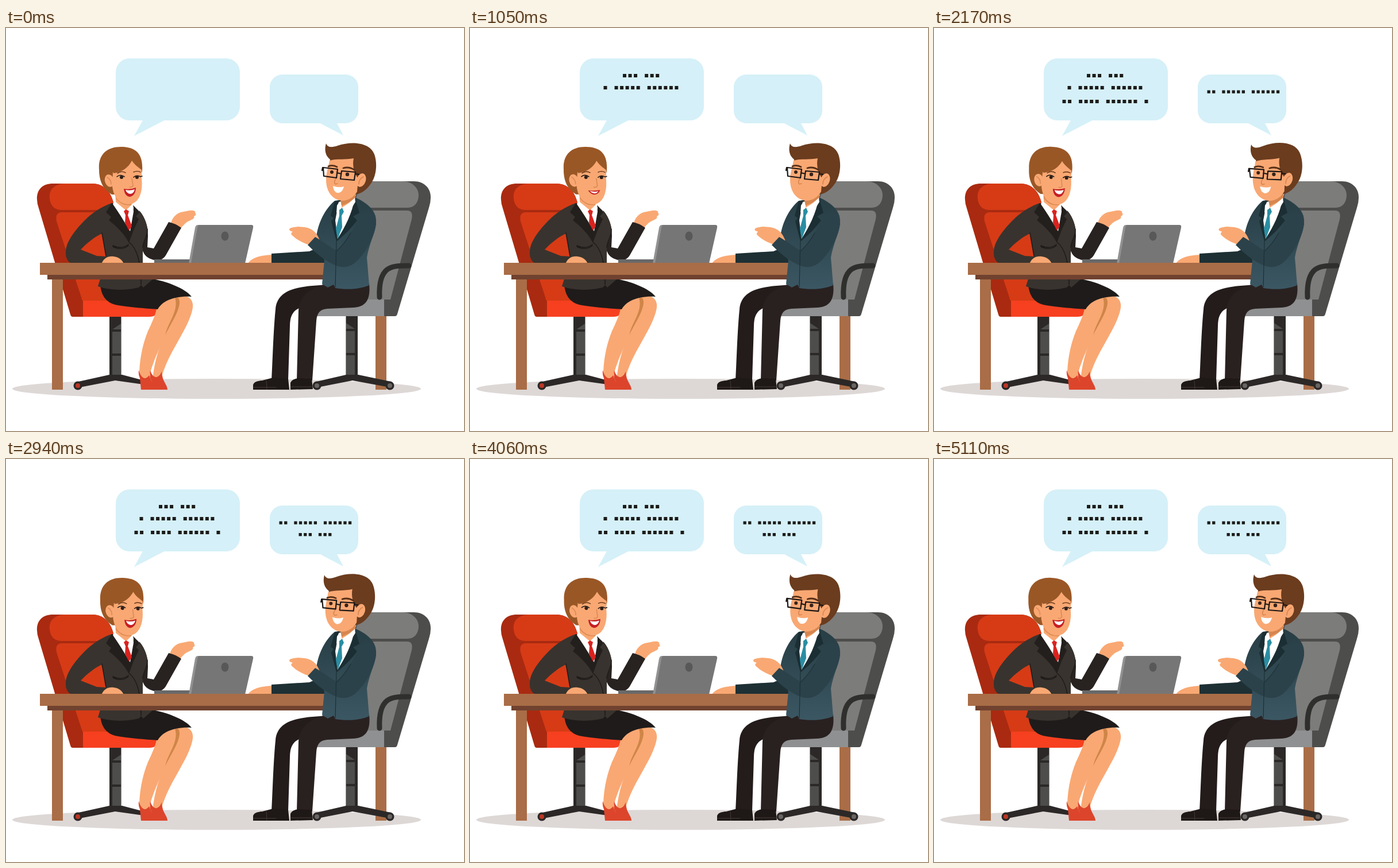
Write an HTML page that moves like this. It is 797 px wide and 702 px high and loops after 5180 ms.

```html
<!DOCTYPE html>
<html lang="en">
<head>
<meta charset="utf-8">
<title>Conversation at a desk</title>
<style>
html, body { margin: 0; width: 100%; height: 100%; overflow: hidden; background: #fff; }
svg { display: block; width: 100%; height: 100%; }
.line { fill: none; stroke-linecap: round; stroke-linejoin: round; }
.skin { fill: #f9a873; }
.wood { fill: #a96d47; }
.dark { fill: #2b2827; }
.grey { fill: #4d4d4c; }
</style>
</head>
<body>
<svg viewBox="0 0 797 702">
  <defs>
    <linearGradient id="suit" x1="0" y1="0" x2="0" y2="1">
      <stop offset="0" stop-color="#273d44"/><stop offset="1" stop-color="#3b5763"/>
    </linearGradient>
    <g id="post">
      <path class="dark" d="M180 502h20.500v104h-20.500z"/>
      <path class="grey" d="M185 524L200 514V524zM185 528h15v38h-15zM185 570h15v34h-15z"/>
    </g>
  </defs>

  <g fill="#d5f0f8">
    <rect x="191" y="53" width="216" height="108" rx="24"/>
    <path d="M239 159L223 188L279 159z"/>
    <rect x="459" y="81" width="154" height="85" rx="22"/>
    <path d="M543 164L587 187L575 164z"/>
  </g>
  <g id="dots" fill="#1c1c1a"></g>

  <ellipse cx="366.500" cy="628.500" rx="355.500" ry="17.500" fill="#ddd8d6"/>

  <!-- red chair -->
  <path fill="#a92a10" d="M54 299C53 281 64 271 82 271H150C172 271 183 287 187 304L212 503H116Q113 503 112 499L57 314Q54 306 54 299z"/>
  <path fill="#d63b16" d="M76 297C74 279 88 271 103 271H150C171 271 182 286 187 304L190 317H95C83 316 77 308 76 297zM96 321H196L215 475H133L88 337Q85 322 96 321z"/>
  <path fill="#f64020" d="M134 475H275L264 495Q260 503 250 503H134z"/>
  <use href="#post" y="1"/>
  <path class="dark" d="M126 616L180 604H202L240 614V621L190 614L128 626z"/>
  <circle class="dark" cx="125" cy="623" r="7.500"/><circle cx="125" cy="623" r="4" fill="#bd3524"/>
  <path class="wood" d="M80 436H99V630H80z"/>

  <!-- woman: legs, skirt -->
  <path class="skin" d="M262 489C268 475 282 467 298 466L303 478C300 495 288 515 279 532C268 556 256 580 250 604L258 624L238 618L232 600C233 570 240 545 247 528C253 515 259 503 262 489z"/>
  <path class="skin" d="M292 468C313 462 327 470 325 487C322 507 308 530 297 550C286 569 278 585 272 604L274 620L258 618L256 604C259 580 267 553 277 533C290 510 301 494 292 468z"/>
  <path fill="#cf8548" d="M293 467C300 466 304 474 301 485C297 502 284 519 277 535C281 513 303 491 293 467z"/>
  <g fill="#dc452b">
    <path d="M231 596C234 607 241 616 249 605C252 616 260 622 260 630H235L233 610Q230 604 231 596z"/>
    <path d="M251 596C254 608 264 615 271 598C271 615 281 621 281 630H257Q256 618 251 610Q250 603 251 596z"/>
  </g>
  <path fill="#1f1b1a" d="M164 448L255 437C282 442 312 454 323 468C294 466 272 475 264 490C235 488 203 485 190 482C172 477 166 464 164 448z"/>

  <!-- woman: jacket, arms -->
  <path id="handW" class="skin" d="M286 348C286 336 292 325 304 321L319 318C326 317 331 319 329 322C332 324 330 327 327 328C329 331 325 333 321 335C313 338 307 344 300 356z"/>
  <path fill="#282321" d="M232 318C244 331 247 350 247 362L246 382L257 384L283 338Q294 340 305 348L278 396C272 405 263 407 254 403C244 400 238 393 236 381z"/>
  <path fill="#38332e" d="M184 305C166 311 150 322 138 334C122 350 105 371 104 389C103 401 109 411 119 411H172L160 450C183 458 212 457 231 452L235 448L239 452L255 438L238 411V380C243 368 247 360 246 348C244 334 234 318 220 309z"/>
  <path fill="#d63b16" d="M130 386C140 375 154 364 167 358L174 398L158 397z"/>
  <path class="skin" d="M166 411C170 401 177 397 187 398C196 399 202 403 205 411z"/>
  <path class="line" stroke="#1d1a19" stroke-width="1.500" d="M167 357L174 397M186 381C197 386 206 385 213 379M186 379C197 384 206 383 213 377M214 373C230 385 235 412 235 447M246 350C247 362 239 370 238 382"/>
  <path fill="#231f1d" d="M184 305L174 321L183 329L179 335C192 345 205 358 214 374L222 352L231 333L226 328L232 321L220 307z"/>
  <path fill="#fff" d="M186 305L193 300L221 302L222 320L216 354L200 328z"/>
  <path class="skin" d="M190 282L191 305L208 318L219 308V290z"/>
  <path fill="#dd8b55" d="M191 297Q203 312 219 308V302L191 285z"/>
  <path fill="#fff" d="M191 303L208 317L199 326L186 307zM219 307L211 317L219 325L222 313z"/>
  <path fill="#d9231f" d="M205 319L209 316L214 319L212 326L219 345L214 353L207 339L208 326z"/>

  <!-- woman: head -->
  <g id="headW">
    <path fill="#9a5726" d="M162 247C160 222 174 207 200 207C226 207 239 219 237 249L226 290H184C167 280 162 264 162 247z"/>
    <path class="skin" d="M186 251C203 251 213 243 219 231C224 239 231 243 236 247V262C239 288 230 308 212 307C196 306 187 293 185 276z"/>
    <ellipse class="skin" cx="180" cy="266" rx="8" ry="11" transform="rotate(-15 180 266)"/>
    <path class="line" stroke="#dc8a55" stroke-width="1.600" d="M176 260Q183 264 183 272M219 262L221 275Q219 278 215 277"/>
    <path fill="#9a5726" d="M183 237L222 224C215 241 204 251 187 253z"/>
    <path class="line" stroke="#74401f" stroke-width="1.600" d="M194 253Q201 248 208 252M222 251Q228 248 234 251"/>
    <path class="line" stroke="#241b18" stroke-width="1.600" d="M193 259Q199 254 206 259M222 260Q227 255 234 259L237 258"/>
    <circle cx="201" cy="260" r="3" fill="#30201a"/><circle cx="228" cy="260" r="3" fill="#30201a"/>
    <g id="smileW">
      <path fill="#c51f24" d="M205 280Q216 282 226 278C226 290 219 294 215 294C209 293 206 288 205 280z"/>
      <path fill="#fff" d="M208 282Q216 284 224 281Q222 289 216 289Q210 288 208 282z"/>
    </g>
    <g id="talkW">
      <path fill="#c51f24" d="M205 283Q216 284 226 282Q223 290 216 290Q210 290 205 283z"/>
      <path fill="#fff" d="M208 284Q216 286 223 284Q220 288 216 288Q212 288 208 284z"/>
    </g>
  </g>

  <!-- laptop -->
  <path fill="#696969" d="M258 403H322V410H258z"/>
  <path fill="#929292" d="M334 343H345L330 410H318L329 348Q330 343 334 343z"/>
  <path fill="#767676" d="M337 343H427Q431 343 430 348L416 410H322L333 348Q334 343 337 343z"/>
  <ellipse cx="381" cy="362.500" rx="6.500" ry="8" fill="#585858"/>

  <!-- grey chair -->
  <path class="wood" d="M643 495H662V630H643z"/>
  <path class="grey" d="M739 296C740 280 728 267 710 267H640C620 267 610 283 606 300L600 502H677Q680 502 681 498L736 313Q739 304 739 296z"/>
  <path fill="#7c7c7b" d="M718 293C719 278 706 267 690 267H640C622 267 612 282 608 300L605 313H699C711 313 717 304 718 293zM600 318H698Q709 318 706 333L669 473H600z"/>
  <path fill="#8f9091" d="M541 485L560 473H658V502H539z"/>
  <path class="line" stroke="#2f2f2e" stroke-width="9" d="M650 469C649 447 653 429 663 421C672 414 686 414 701 414"/>
  <use href="#post" transform="matrix(-1 0 0 1 792 0)"/>
  <path class="dark" d="M540 616L592 604H613L670 616L668 626L603 614L542 626z"/>
  <g class="dark"><circle cx="541" cy="623" r="7.500"/><circle cx="668" cy="623" r="7.500"/></g>
  <g fill="#686563"><circle cx="541" cy="623" r="4"/><circle cx="668" cy="623" r="4"/></g>

  <!-- table, far arm -->
  <path class="skin" d="M421 410C427 401 440 396 464 395V410z"/>
  <path fill="#1e3034" d="M462 393L528 389L556 377V411H462z"/>
  <path class="wood" d="M59 409H554V430H59z"/>
  <path fill="#70422f" d="M72 430H554V438H72z"/>

  <!-- man: legs -->
  <path fill="#231c1b" d="M560 447C520 450 472 450 469 490C465 530 464 580 462 614H491L494 519C494 503 499 493 510 488L580 481z"/>
  <path fill="#292120" d="M632 445C635 475 625 486 604 487L559 489C546 490 541 497 540 511L533 614H506L509 493C510 470 524 456 552 447z"/>
  <path fill="#1e1817" d="M430 630V622Q431 615 446 614L465 609L491 611L493 630zM495 630V618Q497 612 508 610L532 611L534 629z"/>
  <path class="line" stroke="#453a36" stroke-width="1" d="M431 626H470M453 614L454 629M496 625H532"/>

  <!-- man: jacket -->
  <path fill="url(#suit)" d="M572 301L607 295C628 304 645 318 644 337C642 357 631 380 628 400L632 448C614 456 590 456 573 453L570 447L560 452L550 446L554 405L540 364C543 340 555 315 572 301z"/>
  <path fill="#1b2e33" d="M572 302L565 327L570 331L566 337L575 372C592 358 603 346 611 335L604 328L615 322L607 295z"/>
  <path fill="#fff" d="M579 303L607 296C602 323 591 345 577 367L573 335z"/>
  <path class="skin" d="M584 286L612 273L607 299L584 313z"/>
  <path fill="#d78650" d="M582 300Q598 300 609 285L607 299L584 310z"/>
  <path fill="#fff" d="M607 296L587 313L596 322L608 303zM580 303L581 314L575 322L576 309z"/>
  <path fill="#2a8ea3" d="M580 317L585 313L588 320L584 327L585 347L577 368L574 350L580 327z"/>
  <path id="handM" class="skin" d="M546 370C541 356 533 349 520 347L508 346C500 347 493 348 493 351C493 353 496 354 499 355C495 357 496 360 499 362C506 369 518 375 534 380z"/>
  <path fill="#2b424b" d="M616 330C630 311 645 325 644 342C640 370 622 397 606 410C595 418 582 418 570 412C553 404 538 391 525 378L538 364C552 372 566 383 576 388C592 374 601 354 616 330z"/>
  <path class="line" stroke="#1d3036" stroke-width="1.200" d="M575 372L573 451M576 388Q589 376 600 357"/>

  <!-- man: head -->
  <g id="headM">
    <path fill="#6b3c1e" d="M557 201C560 209 568 208 577 205C603 196 634 200 641 220C647 237 644 259 635 271C627 283 617 289 608 290L600 243L563 237L564 229C555 222 554 211 557 201z"/>
    <path class="skin" d="M563 231C576 227 591 230 605 227C602 242 607 255 613 262L611 285C605 296 592 303 580 300C565 296 557 282 557 264C557 252 561 242 563 231z"/>
    <ellipse class="skin" cx="618" cy="265" rx="8" ry="12" transform="rotate(18 618 265)"/>
    <path class="line" stroke="#d78650" stroke-width="1.600" d="M622 259Q614 263 614 272M576 260Q569 268 573 272L577 271"/>
    <path class="line" stroke="#573018" stroke-width="2.800" d="M561 241Q568 238 576 242M587 244Q597 241 606 247"/>
    <circle cx="567" cy="251" r="3" fill="#38231a"/><circle cx="594" cy="255" r="3.200" fill="#38231a"/>
    <path class="line" stroke="#1d1716" stroke-width="2.200" d="M552 243L577 246L575 261L553 258zM584 249L608 251L606 265L582 263zM576 252L583 254M608 254L614 255M551 243L550 248"/>
    <path id="smileM" fill="#fff" d="M569 275Q579 279 588 276C586 285 581 288 576 287Q570 285 569 275z"/>
  </g>
</svg>
<script>
const STEP = 70, FRAMES = 74;
const $ = id => document.getElementById(id);

// Each row of dots: x, y, pitch, size, words
const rows = [
  [266, 80, 9.53, 6, '... ...'],
  [232.5, 101, 9.53, 6, '. ..... ......'],
  [223.5, 125, 9.53, 6, '.. .... ...... .'],
  [475.5, 108.5, 8.6, 5.3, '.. ..... ......'],
  [509.5, 129, 8.6, 5.3, '... ...']
].map(([x, y, pitch, size, words]) => [...words].map((c, i) => {
  if (c === ' ') return null;
  const dot = document.createElementNS('http://www.w3.org/2000/svg', 'rect');
  const box = { x: x + i * pitch, y, width: size, height: size };
  for (const k in box) dot.setAttribute(k, box[k]);
  return $('dots').appendChild(dot);
}));

const times = [0, 15, 31, 42, 52, 64, 73, FRAMES];
const sway = {
  headW: [0, 1.5, 5, 3, 0, 5, 3.5, 0],
  headM: [0, 0, -5, -3, -1.5, 2.5, 0, 0],
  handW: [0, -2, -2, -2, 0, 0, 0, 0],
  handM: [0, 2.5, 2.5, 0, 0, 0, 1, 0]
};

function pose(part, f) {
  const i = times.findIndex((t, n) => f < times[n + 1]);
  const u = (f - times[i]) / (times[i + 1] - times[i]);
  const [a, b] = sway[part].slice(i, i + 2);
  return a + (b - a) * u * u * (3 - 2 * u);
}

const move = (id, value) => $(id).setAttribute('transform', value);
const show = (el, on) => el.setAttribute('visibility', on ? 'visible' : 'hidden');

function draw(ms) {
  const f = Math.floor(ms / STEP) % FRAMES;
  rows.forEach((row, r) => {
    const typed = Math.ceil((f - 8 * r) / 7 * row.length);
    row.forEach((dot, i) => dot && show(dot, i < typed));
  });

  move('headW', `rotate(${pose('headW', f) / 1.95} 205 320)`);
  move('headM', `rotate(${pose('headM', f) / 2} 592 315)`);
  move('handW', `translate(${pose('handW', f)} 0)`);
  move('handM', `translate(${pose('handM', f)} 0)`);

  // She talks while her bubble fills, and he listens
  const herTurn = f > 0 && f < 25;
  const small = herTurn && Math.floor(f / 3) % 2 === 1;
  show($('smileW'), !small);
  show($('talkW'), small);
  show($('smileM'), !herTurn);
}

const start = performance.now();
function tick() {
  draw(performance.now() - start);
  requestAnimationFrame(tick);
}
draw(0);
requestAnimationFrame(tick);
</script>
</body>
</html>
```
